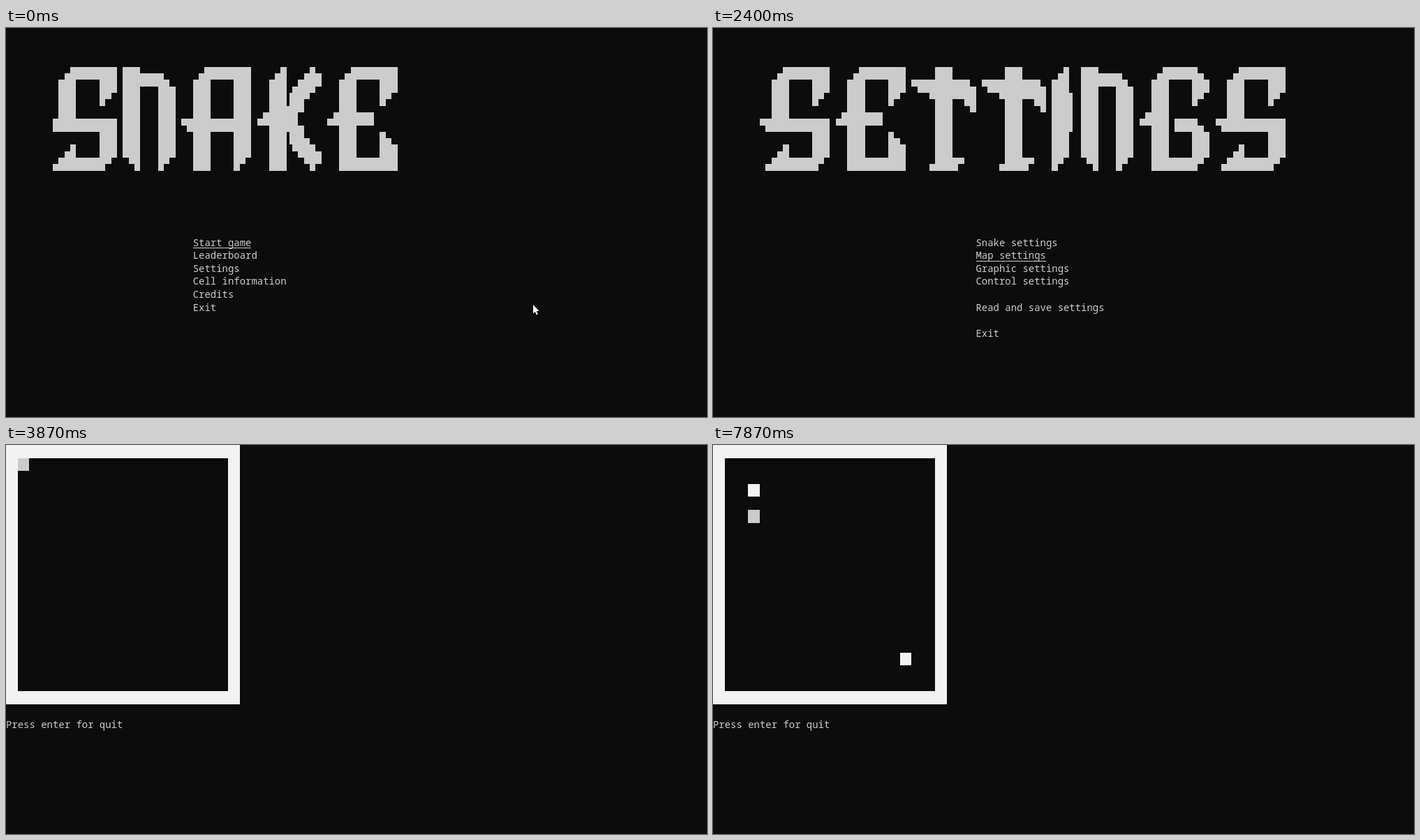
An HTML page with a canvas that plays this animation: 1004 px wide and 558 px high, repeating every 8 s.

```html
<!DOCTYPE html>
<html lang="en">
<head>
<meta charset="utf-8">
<title>Console game menu</title>
<style>
  html, body { margin: 0; width: 100%; height: 100%; overflow: hidden; background: #0c0c0c; }
  canvas { display: block; }
</style>
</head>
<body>
<canvas id="stage" width="1004" height="558"></canvas>
<script>
const ctx = document.getElementById('stage').getContext('2d');

const LOOP = 8000;
const CW = 1004 / 120, CH = 558 / 30;   // console cell
const BACK = '#0c0c0c', GREY = '#cccccc', WHITE = '#f2f2f2';
const FONT = `${CW / 0.6}px "Noto Sans Mono", "DejaVu Sans Mono", monospace`;

// Banner lettering in block characters, one console row per line.
const LETTERS = {
  S: `   ▄████████
  ███    ███
  ███    █▀
  ███
▀███████████
         ███
   ▄█    ███
 ▄████████▀`,
  N: `███▄▄▄▄
███▀▀▀██▄
███   ███
███   ███
███   ███
███   ███
███   ███
 ▀█   █▀`,
  A: `   ▄████████
  ███    ███
  ███    ███
  ███    ███
▀███████████
  ███    ███
  ███    ███
  ███    █▀`,
  K: `   ▄█   ▄█▄
  ███ ▄███▀
  ███▐██▀
 ▄█████▀
▀▀█████▄
  ███▐██▄
  ███ ▀███▄
  ███   ▀█▀`,
  E: `   ▄████████
  ███    ███
  ███    █▀
 ▄███▄▄▄
▀▀███▀▀▀
  ███    █▄
  ███    ███
  ██████████`,
  T: `    ███
▀█████████▄
   ▀███▀▀██
    ███   ▀
    ███
    ███
    ███
   ▄████▀`,
  I: ` ▄█
███
███▌
███▌
███▌
███
███
█▀`,
  G: `   ▄██████▄
  ███    ███
  ███    █▀
 ▄███
▀▀███ ████▄
  ███    ███
  ███    ███
  ████████▀`
};

// Part of a cell each block covers: x, y, width, height.
const BLOCKS = {
  '█': [0, 0, 1, 1], '▀': [0, 0, 1, 0.5], '▄': [0, 0.5, 1, 0.5],
  '▌': [0, 0, 0.5, 1], '▐': [0.5, 0, 0.5, 1]
};

const MAIN = {
  title: 'SNAKE', titleCol: 7, col: 32,
  items: ['Start game', 'Leaderboard', 'Settings', 'Cell information', 'Credits', 'Exit']
};
const SETTINGS = {
  title: 'SETTINGS', titleCol: 8, col: 45,
  items: ['Snake settings', 'Map settings', 'Graphic settings', 'Control settings', '',
    'Read and save settings', '', 'Exit']
};
const MAP = {
  title: 'SETTINGS', titleCol: 8, col: 45,
  items: ['Map length: 20', 'Map width: 20', 'Enable solid walls: 0', 'Enable bonus apples: 1',
    'Show score: 1', '', 'Make custom map', '', 'Exit']
};

const menu = (page, selected, scroll = 0) => () => drawMenu(page, selected, scroll);
const editor = (x, y, walls = []) => () => drawEditor(x, y, walls);
const PLACED = [[3, 3], [16, 16]];

const SCENES = [
  [0, menu(MAIN, 0)],
  [1130, menu(MAIN, 1)],
  [1400, menu(MAIN, 2)],
  [1670, menu(SETTINGS, 0)],
  [2400, menu(SETTINGS, 1)],
  [2670, menu(SETTINGS, 1, 1)],
  [2730, menu(MAP, 0)],
  [3000, menu(MAP, 8)],
  [3600, menu(MAP, 6)],
  [3870, editor(1, 1)],
  [4270, editor(1, 2)],
  [4600, editor(1, 3)],
  [4930, editor(2, 3)],
  [6000, editor(3, 3)],
  [6800, editor(3, 4, PLACED)],
  [7870, editor(3, 5, PLACED)]
];

const POINTER = [[0, [755, 397]], [330, [750, 421]], [400, [741, 454]], [470, null]];
const ARROW = new Path2D('M0 0V12.5L2.8 9.9L4.8 14.6L6.8 13.7L4.8 9.1H8.4Z');

function at(steps, t) {
  let value = steps[0][1];
  for (const [start, v] of steps) if (t >= start) value = v;
  return value;
}

// Fills an area given in console cells, snapped to whole pixels.
function fill(col, row, w, h, color) {
  const x = Math.round(col * CW), y = Math.round(row * CH);
  ctx.fillStyle = color;
  ctx.fillRect(x, y, Math.round((col + w) * CW) - x, Math.round((row + h) * CH) - y);
}

function print(text, col, row) {
  ctx.fillStyle = GREY;
  [...text].forEach((ch, i) => ctx.fillText(ch, (col + i) * CW, Math.round(row * CH + 15)));
}

function underline(text, col, row) {
  const x = Math.round(col * CW);
  ctx.fillStyle = GREY;
  ctx.fillRect(x, Math.round(row * CH + 17.4), Math.round((col + text.length) * CW) - x, 1);
}

function drawBanner(word, col, row) {
  for (const letter of word) {
    const lines = LETTERS[letter].split('\n');
    lines.forEach((line, r) => [...line].forEach((ch, c) => {
      const part = BLOCKS[ch];
      if (part && col + c >= 8) fill(col + c + part[0], row + r + part[1], part[2], part[3], GREY);
    }));
    col += Math.max(...lines.map(line => line.length)) + 1;
  }
}

function drawMenu(page, selected, scroll) {
  drawBanner(page.title, page.titleCol, 3 - scroll);
  page.items.forEach((text, i) => {
    const row = 16 - scroll + i;
    print(text, page.col, row);
    if (i === selected) underline(text, page.col, row);
  });
}

function drawEditor(x, y, walls) {
  fill(0, 0, 40, 20, WHITE);
  fill(2, 1, 36, 18, BACK);
  for (const [wx, wy] of walls) fill(wx * 2, wy, 2, 1, WHITE);
  fill(x * 2, y, 2, 1, GREY);
  print('Press enter for quit', 0, 21);
}

function drawPointer(pos) {
  if (!pos) return;
  ctx.save();
  ctx.translate(...pos);
  ctx.fillStyle = '#fff';
  ctx.fill(ARROW);
  ctx.restore();
}

const begin = performance.now();

function frame(now) {
  const t = Math.max(0, now - begin) % LOOP;
  ctx.fillStyle = BACK;
  ctx.fillRect(0, 0, 1004, 558);
  ctx.font = FONT;
  at(SCENES, t)();
  drawPointer(at(POINTER, t));
  requestAnimationFrame(frame);
}
frame(begin);
</script>
</body>
</html>
```
